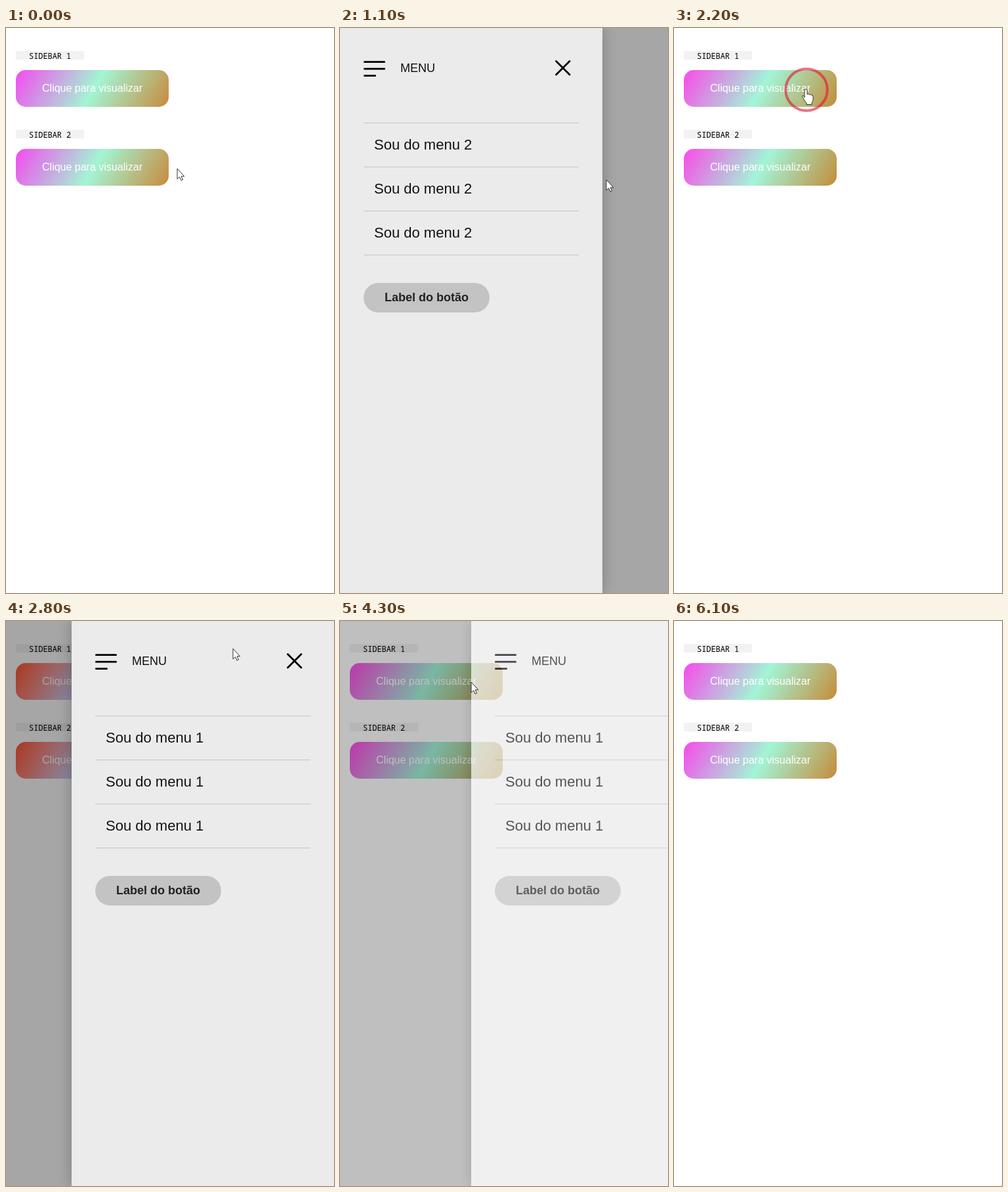
An HTML page that plays this animation: 500x860 px, repeating every 6.2 s.

```html
<!DOCTYPE html>
<html lang="pt">
<head>
<meta charset="utf-8">
<style>
  html, body { margin: 0; width: 100%; height: 100%; overflow: hidden; background: #fff; }
  #stage { position: relative; width: 500px; height: 860px; overflow: hidden; font-family: "Liberation Sans", Arial, sans-serif; }
  #stage div, #stage svg { position: absolute; white-space: nowrap; box-sizing: border-box; }
  .label { left: 15px; width: 104px; height: 13px; padding-left: 20px; background: #f2f2f2; color: #000; font: 11.9px/14px "Noto Sans Mono", monospace; }
  .open { left: 15px; width: 233px; height: 56px; border-radius: 15px; color: #fff; font-size: 16px; line-height: 55px; text-align: center;
    background: linear-gradient(120deg, #f34bf0, #a3f5d4 51%, #c88a3c); }
  .layer { inset: 0; opacity: 0; background: rgba(0, 0, 0, .35); }
  .panel { top: 0; width: 400px; height: 860px; background: #ebebeb; color: #111; box-shadow: 0 0 20px rgba(0, 0, 0, .25); }
  .panel svg { left: 0; top: 0; }
  .title { left: 92px; top: 51px; font-size: 18px; line-height: 21px; }
  .item { left: 36px; width: 328px; height: 68px; padding-left: 16px; border: solid #c4c4c4; border-width: 1px 0; font-size: 22px; line-height: 65px; }
  .action { left: 36px; top: 388px; width: 192px; height: 45px; border-radius: 23px; background: #c3c3c3; color: #222; font: bold 18px/44px "Liberation Sans", Arial, sans-serif; text-align: center; }
  #pointer { left: 0; top: 0; }
</style>
</head>
<body>
<div id="stage">
  <svg id="pointer" width="500" height="860">
    <circle id="ring" r="32" fill="none" stroke="rgb(222,20,52)" stroke-opacity=".6" stroke-width="4"/>
    <g fill="#fff" stroke="#333" stroke-linejoin="round">
      <path id="arrow" d="M0 0V16L3.7 12.7 6 18 8.5 17 6.2 11.8H10.8Z"/>
      <path id="hand" d="M-2 13V2a2 2 0 0 1 4 0v6q2-1.5 3.5 .5 2-1 3 .7 2.5-.8 2.5 1.8v5q0 3-2 5v2.5h-8v-2.5q-2.5-2-4.5-6.5-3-3.5-1.5-4.5 1.5-.5 3 2.5z"/>
    </g>
  </svg>
</div>
<script>
const LOOP = 6200, STEP = 100, SLIDE = 300, RING = 240;
const $ = id => document.getElementById(id);
const stage = $('stage');

// time, x, y, hand cursor from here on
const path = [
  [0, 261, 214, 0], [200, 204, 212, 1], [400, 202, 212, 0], [800, 330, 205, 0],
  [1100, 406, 231, 0], [1380, 431, 382, 0], [1600, 425, 370, 0], [2000, 204, 98, 1],
  [2180, 201, 93, 1], [2300, 201, 93, 0], [2800, 346, 42, 0], [2950, 438, 61, 1],
  [3150, 438, 61, 0], [3800, 203, 95, 1], [4000, 200, 93, 1], [4080, 200, 93, 0],
  [4300, 200, 93, 0], [5050, 59, 298, 0], [5150, 59, 298, 0], [5300, 64, 340, 0],
  [5600, 63, 608, 0], [5700, 62, 803, 0], [5800, 62, 890, 0], [LOOP, 62, 890, 0]
];

// time, x, y
const clicks = [
  [300, 202, 212], [1380, 431, 382], [2185, 202, 94],
  [3000, 438, 61], [4000, 200, 93], [5100, 59, 298]
];

const clamp = v => Math.min(1, Math.max(0, v));

function add(parent, cls, text = '', top) {
  const el = document.createElement('div');
  el.className = cls;
  el.textContent = text;
  if (top !== undefined) el.style.top = top + 'px';
  parent.append(el);
  return el;
}

function makeMenu(n, side, spans) {
  const layer = add(stage, 'layer');
  const panel = add(layer, 'panel');
  panel.style[side] = 0;
  panel.innerHTML = `<svg width="400" height="100" fill="none" stroke="#000" stroke-width="2.8" stroke-linecap="round">
    <path d="M37.4 51.7H67.6M37.4 62.2H67.6M37.4 72.7H53.6M329.5 50.5l20.5 20.5m0-20.5l-20.5 20.5"/></svg>`;
  add(panel, 'title', 'MENU');
  for (let i = 0; i < 3; i++) add(panel, 'item', 'Sou do menu ' + n, 144 + 67 * i);
  add(panel, 'action', 'Label do botão');
  return { layer, panel, spans, dir: side === 'left' ? -1 : 1 };
}

const buttons = [1, 2].map(n => {
  const y = 35 + (n - 1) * 120;
  add(stage, 'label', 'SIDEBAR ' + n, y);
  return add(stage, 'open', 'Clique para visualizar', y + 29);
});

const menus = [
  makeMenu(2, 'left', [[370, 1420]]),
  makeMenu(1, 'right', [[2270, 3050], [4075, 5200]])
];
stage.append($('pointer'));

function drawMenu(menu, t) {
  let p = 0;
  for (const [open, close] of menu.spans)
    p = Math.max(p, clamp((t - open) / SLIDE) - clamp((t - close) / SLIDE));
  menu.layer.style.opacity = p ** 1.15;
  menu.panel.style.transform = `translateX(${menu.dir * 400 * (1 - p)}px)`;
}

function drawPointer(t) {
  let i = 0;
  while (i < path.length - 2 && t >= path[i + 1][0]) i++;
  const [t0, x0, y0, hand] = path[i], [t1, x1, y1] = path[i + 1];
  const k = (t - t0) / (t1 - t0);
  const move = `translate(${x0 + (x1 - x0) * k} ${y0 + (y1 - y0) * k})`;
  for (const id of ['arrow', 'hand']) {
    $(id).setAttribute('transform', move);
    $(id).style.display = (id === 'hand') === !!hand ? '' : 'none';
  }
  const hit = clicks.find(([at]) => t >= at && t < at + RING);
  $('ring').style.display = hit ? '' : 'none';
  if (hit) {
    const s = 1.06 * (1 - (t - hit[0]) / RING);
    $('ring').setAttribute('transform', `translate(${hit[1]} ${hit[2]}) scale(${s})`);
  }
}

function draw(t) {
  const hue = 44 * (1 - Math.cos(6 * Math.PI * t / LOOP));
  for (const b of buttons) b.style.filter = `hue-rotate(${hue}deg)`;
  for (const m of menus) drawMenu(m, t);
  drawPointer(t);
}

const start = performance.now();
function tick() {
  const t = (performance.now() - start) % LOOP;
  draw(Math.floor(t / STEP) * STEP);
  requestAnimationFrame(tick);
}
tick();
</script>
</body>
</html>
```
